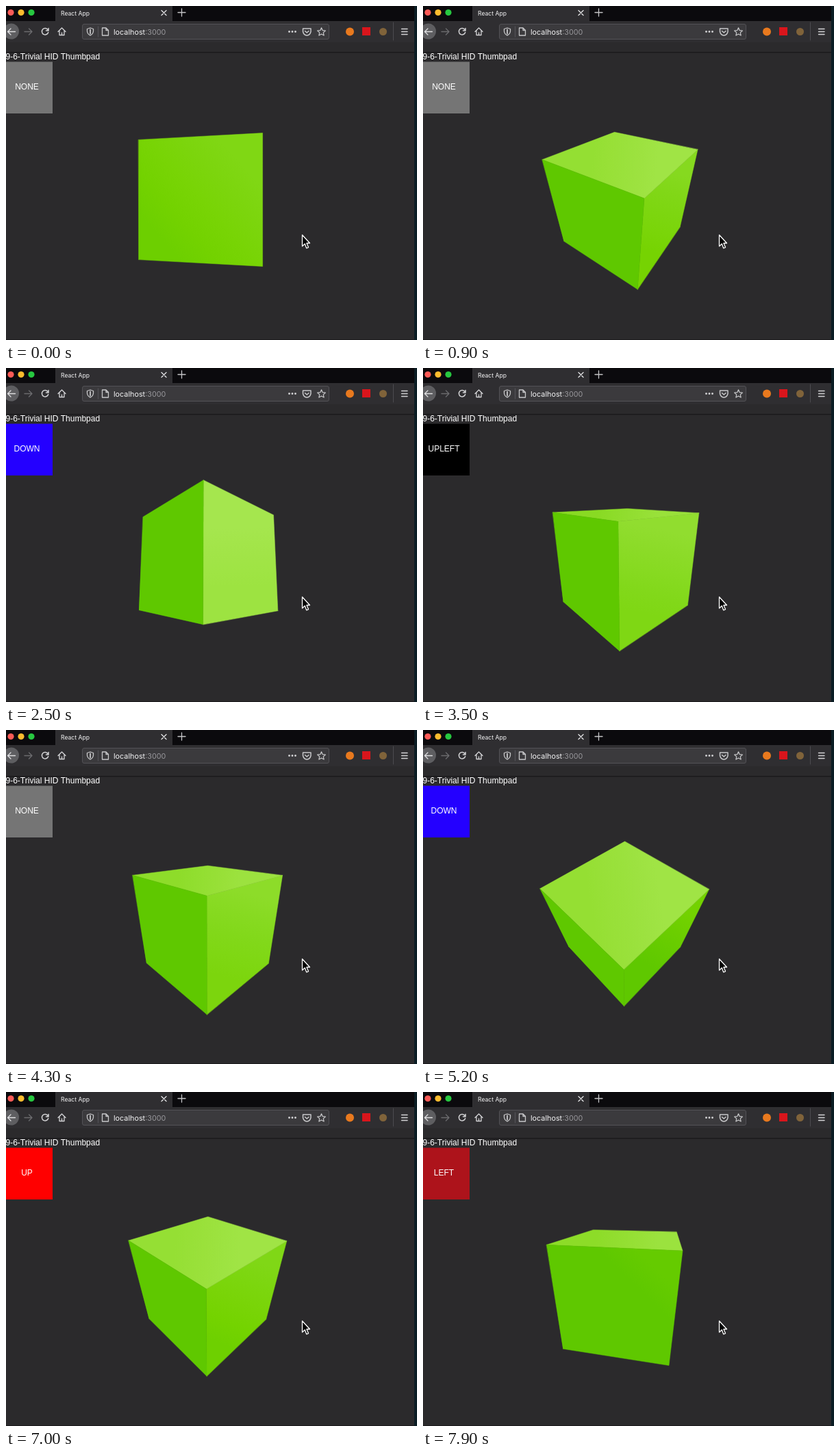
Animation, 600 px wide and 488 px high, one loop 8000 ms. Source, as an HTML page with a canvas:

```html
<!DOCTYPE html>
<html lang="en">
<head>
<meta charset="utf-8">
<title>React App</title>
<style>
  html, body { margin: 0; width: 100%; height: 100%; overflow: hidden; background: #2b2a2c; }
  canvas { display: block; width: 600px; height: 488px; }
</style>
</head>
<body>
<canvas id="stage" width="600" height="488"></canvas>
<script>
const ctx = document.getElementById('stage').getContext('2d');
const LOOP = 8000, STEP = 100, RAD = Math.PI / 180;
const SANS = '"Liberation Sans", Arial, sans-serif';
const UI = 'Inter, Roboto, sans-serif';

// time, tilt, yaw of the cube's nearest vertical edge (degrees);
// DOWN raises the tilt, UP lowers it, LEFT raises the yaw
const POSES = [
  [0, 0, 35.8], [750, 41, 14], [900, 35.1, 9.7], [1150, 35, 0],
  [2000, -15, -2], [2350, -15, -2.3], [2500, -7.2, -2.3], [2950, 18.7, -2.6],
  [3500, 18.7, -3.1], [4150, 19, -0.4], [4250, 24, -0.3], [4600, 24, -0.3],
  [5200, 54.5, -0.3], [5930, 98, -0.4], [6200, 82.4, -0.4],
  [7240, 22.8, -0.5], [7900, 22.8, 33]
];
const LABELS = [
  [0, 'NONE'], [1150, 'UP'], [2000, 'NONE'], [2350, 'DOWN'], [2950, 'NONE'],
  [3400, 'UPLEFT'], [3700, 'NONE'], [4150, 'DOWN'], [4250, 'NONE'],
  [4600, 'DOWN'], [5930, 'UP'], [7200, 'LEFT']
];
const COLORS = {
  NONE: '#757575', UP: '#ff0000', DOWN: '#2400ff', LEFT: '#ad131b', UPLEFT: '#000000'
};
// brightness, r, g, b
const RAMP = [
  [0.3, 95, 200, 0], [0.48, 117, 211, 0], [0.65, 131, 216, 27],
  [0.8, 152, 224, 56], [0.92, 166, 231, 80]
];

function sample(table, x) {
  const last = table[table.length - 1];
  if (x <= table[0][0]) return table[0].slice(1);
  if (x >= last[0]) return last.slice(1);
  const i = table.findIndex(row => row[0] > x);
  const a = table[i - 1], b = table[i];
  const u = (x - a[0]) / (b[0] - a[0]);
  return a.slice(1).map((v, j) => v + (b[j + 1] - v) * u);
}

function rect(x, y, w, h, fill) {
  ctx.fillStyle = fill;
  ctx.fillRect(x, y, w, h);
}

function disc(x, y, r, fill) {
  ctx.fillStyle = fill;
  ctx.beginPath();
  ctx.arc(x, y, r, 0, 7);
  ctx.fill();
}

function text(s, x, y, font, fill, align = 'left') {
  ctx.font = font;
  ctx.fillStyle = fill;
  ctx.textAlign = align;
  ctx.fillText(s, x, y);
}

function stroke(d, color, width = 1.3) {
  ctx.strokeStyle = color;
  ctx.lineWidth = width;
  ctx.stroke(new Path2D(d));
}

function drawBrowser() {
  rect(0, 0, 600, 488, '#2b2a2c');
  rect(0, 0, 600, 22, '#0b0a0d');
  rect(72, 0, 171, 22, '#2f2e31');
  rect(0, 22, 596, 31, '#2f2e31');
  rect(0, 67, 596, 1.5, '#1a191b');
  rect(0, 487, 596, 1, '#1d1c1e');
  rect(596, 0, 4, 488, '#0b1d24');

  disc(7, 9.5, 4.6, '#fc5b57');
  disc(22, 9.5, 4.6, '#fdbc2e');
  disc(37, 9.5, 4.6, '#27c840');
  text('React App', 80, 13.5, '8.6px ' + UI, '#f4f4f5');
  stroke('M227 6.500L234 13.500M234 6.500L227 13.500', '#e4e4e6');
  stroke('M251 9.500H262M256.500 4V15', '#c6c6c8');

  disc(7.5, 37, 11.5, '#5e5e61');
  ctx.lineCap = ctx.lineJoin = 'round';
  stroke('M2.500 37.500H13.500M7 33L2.500 37.500L7 42', '#dedee0');
  stroke('M27 37.500H38M33.500 33L38 37.500L33.500 42', '#6b6b6e');
  stroke('M61 34.500A4.700 4.700 0 1 0 61.700 38.500M62 32.500V36H58.500', '#d4d4d6', 1.5);
  stroke('M76 37.500L81.500 32L87 37.500M78 36.500V42.500H85V36.500M81.500 42V39', '#d4d4d6');

  ctx.beginPath();
  ctx.roundRect(111.5, 26.5, 360, 22, 2.5);
  ctx.fillStyle = '#3b3a3d';
  ctx.fill();
  ctx.strokeStyle = '#535256';
  ctx.lineWidth = 1;
  ctx.stroke();
  stroke('M123 32L127.500 33.500V37Q127 41 123 43Q119 41 118.500 37V33.500Z', '#c8c8ca');
  stroke('M123 34.500V40.500', '#c8c8ca', 1.8);
  stroke('M134.500 30V45', '#56555a', 1);
  stroke('M140.500 32H146L149.500 35.500V43H140.500ZM146 32V35.500H149.500', '#c8c8ca');
  text('localhost', 157, 41.5, '10.8px ' + UI, '#f4f4f5');
  const w = ctx.measureText('localhost').width;
  text(':3000', 157 + w, 41.5, '10.8px ' + UI, '#98979b');
  for (let i = 0; i < 3; i++) disc(413.5 + i * 4.5, 37.5, 1.4, '#d0d0d2');
  stroke('M433.500 33H445V37.500Q444 42.500 439.250 43Q434.500 42.500 433.500 37.500ZM436.500 36.500L439.250 39L442 36.500', '#c8c8ca', 1.5);

  ctx.beginPath();
  for (let i = 0; i < 10; i++) {
    const r = i % 2 ? 2.9 : 6.2, a = (i * 36 - 90) * RAD;
    ctx.lineTo(460.5 + r * Math.cos(a), 38 + r * Math.sin(a));
  }
  ctx.closePath();
  ctx.strokeStyle = '#c8c8ca';
  ctx.lineWidth = 1.2;
  ctx.stroke();

  disc(502, 37.5, 6, '#e8791e');
  rect(520, 31, 12, 12, '#d9151c');
  disc(550.5, 37.5, 5.5, '#80633a');
  stroke('M565.500 24V50', '#4c4b4f', 1);
  stroke('M577.500 33.500H586M577.500 37.500H586M577.500 41.500H586', '#d4d4d6', 1.4);
}

function drawLabel(t) {
  const name = LABELS.filter(l => l[0] <= t).pop()[1];
  text('9-6-Trivial HID Thumbpad', -0.5, 78, '12px ' + SANS, '#ffffff');
  rect(0, 81.5, 68, 75.5, COLORS[name]);
  text(name, 30.5, 122, '12px ' + SANS, '#ffffff', 'center');
}

const LIGHT = [1, 1, 1].map(v => v / Math.sqrt(3));
const dot = (p, q) => p[0] * q[0] + p[1] * q[1] + p[2] * q[2];
const along = (p, q, s) => p.map((v, i) => v + q[i] * s);

function project([x, y, z]) {
  const s = 278 / (2 - z);
  return [294 + x * s, 283 - y * s];
}

function shade(k) {
  return 'rgb(' + sample(RAMP, k).map(Math.round).join(',') + ')';
}

function drawCube(t) {
  const [tilt, edge] = sample(POSES, t);
  const a = tilt * RAD, b = (edge - 45) * RAD;
  const turn = ([x, y, z]) => {
    const h = z * Math.cos(b) - x * Math.sin(b);
    return [
      x * Math.cos(b) + z * Math.sin(b),
      y * Math.cos(a) - h * Math.sin(a),
      y * Math.sin(a) + h * Math.cos(a)
    ];
  };
  const axes = [[1, 0, 0], [0, 1, 0], [0, 0, 1]].map(turn);

  for (let i = 0; i < 3; i++) for (const side of [-1, 1]) {
    const n = axes[i].map(v => v * side);
    if (2 * n[2] <= 0.5) continue;
    const u = axes[(i + 1) % 3], v = axes[(i + 2) % 3];
    const mid = n.map(c => c / 2);
    const k = dot(n, LIGHT);
    const slope = along(LIGHT, n, -k);
    const spread = 0.085 * dot(slope, slope);
    const from = project(along(mid, slope, -0.5));
    const to = project(along(mid, slope, 0.5));
    const fill = ctx.createLinearGradient(...from, ...to);
    for (let j = 0; j <= 4; j++) {
      fill.addColorStop(j / 4, shade(k + spread * (j * 0.75 - 1)));
    }
    ctx.beginPath();
    for (const [p, q] of [[-1, -1], [1, -1], [1, 1], [-1, 1]]) {
      ctx.lineTo(...project(along(along(mid, u, p / 2), v, q / 2)));
    }
    ctx.closePath();
    ctx.fillStyle = fill;
    ctx.fill();
    ctx.strokeStyle = fill;
    ctx.lineWidth = 0.5;
    ctx.stroke();
  }
}

function drawPointer() {
  const arrow = new Path2D('M432.500 334.500V351L436.300 347.500L438.700 353.800L441.500 352.600L438.900 346.500H443.500Z');
  ctx.fillStyle = '#000';
  ctx.fill(arrow);
  ctx.strokeStyle = '#fff';
  ctx.lineWidth = 1.3;
  ctx.stroke(arrow);
}

const start = performance.now();
function draw() {
  const elapsed = Math.max(0, performance.now() - start) % LOOP;
  const t = Math.floor(elapsed / STEP) * STEP;
  drawBrowser();
  drawCube(t);
  drawLabel(t);
  drawPointer();
  requestAnimationFrame(draw);
}
draw();
</script>
</body>
</html>
```
